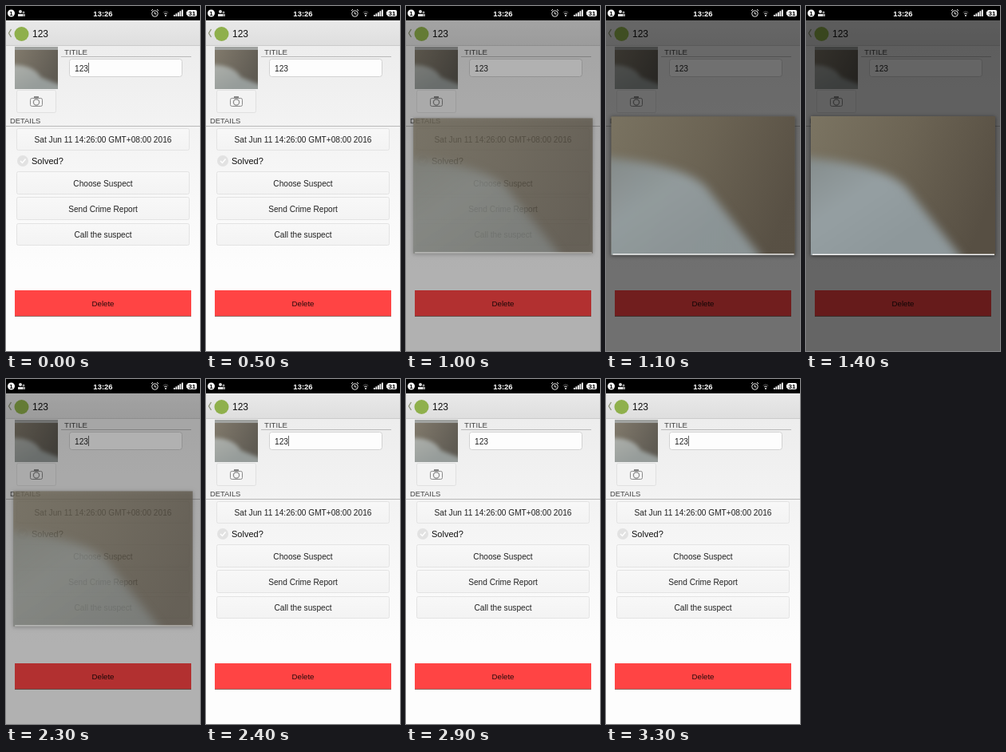
Write an HTML page with a canvas that moves like this. It is 243x432 px and loops after 3400 ms.

```html
<!DOCTYPE html>
<html lang="en">
<head>
<meta charset="utf-8">
<title>Crime details</title>
<style>
html, body { margin: 0; width: 100%; height: 100%; overflow: hidden; background: #000; }
canvas { display: block; width: 100vw; height: 100vh; }
</style>
</head>
<body>
<canvas id="stage" width="243" height="432"></canvas>
<script>
const ctx = document.getElementById('stage').getContext('2d');
const LOOP = 3400, STEP = 100;
const FONT = '"Liberation Sans", Arial, sans-serif';

function rect(x, y, w, h, fill) {
  ctx.fillStyle = fill;
  ctx.fillRect(x, y, w, h);
}

function box(x, y, w, h, r, fill, stroke) {
  ctx.beginPath();
  ctx.roundRect(x + .5, y + .5, w - 1, h - 1, r);
  ctx.fillStyle = fill;
  ctx.fill();
  ctx.strokeStyle = stroke;
  ctx.lineWidth = 1;
  ctx.stroke();
}

function disc(x, y, r, fill) {
  ctx.beginPath();
  ctx.arc(x, y, r, 0, Math.PI * 2);
  ctx.fillStyle = fill;
  ctx.fill();
}

function ring(x, y, r, stroke, width = 1, from = 0, to = Math.PI * 2) {
  ctx.beginPath();
  ctx.arc(x, y, r, from, to);
  ctx.strokeStyle = stroke;
  ctx.lineWidth = width;
  ctx.stroke();
}

function line(points, stroke, width = 1) {
  ctx.beginPath();
  points.forEach(([x, y]) => ctx.lineTo(x, y));
  ctx.strokeStyle = stroke;
  ctx.lineWidth = width;
  ctx.stroke();
}

function text(str, x, y, size, color = '#222', align = 'left', weight = '') {
  ctx.font = `${weight} ${size}px ${FONT}`;
  ctx.textAlign = align;
  ctx.fillStyle = color;
  ctx.fillText(str, x, y);
}

function gradient(x0, y0, x1, y1, ...colors) {
  const g = ctx.createLinearGradient(x0, y0, x1, y1);
  colors.forEach((c, i) => g.addColorStop(i / (colors.length - 1), c));
  return g;
}

// Soft abstract photo: warm wall above, pale curved surface below.
function photo(x, y, w, h, blur, wall, pale, edge) {
  ctx.save();
  ctx.beginPath();
  ctx.rect(x, y, w, h);
  ctx.clip();
  ctx.translate(x, y);
  rect(0, 0, w, h, gradient(0, 0, w, h * .5, ...wall));
  ctx.filter = `blur(${blur}px)`;
  const [a, b, c, d] = edge.map(([u, v]) => [u * w, v * h]);
  ctx.beginPath();
  ctx.moveTo(-w * .2, a[1] - h * .03);
  ctx.lineTo(...a);
  ctx.quadraticCurveTo(...b, ...c);
  ctx.lineTo(...d);
  ctx.lineTo(d[0], h * 1.2);
  ctx.lineTo(-w * .2, h * 1.2);
  ctx.closePath();
  ctx.fillStyle = gradient(0, h * .3, w * .35, h, ...pale);
  ctx.fill();
  ctx.restore();
}

function statusBar() {
  rect(0, 0, 243, 18, '#000');
  disc(6.5, 9, 4.5, '#fff');
  text('1', 6.5, 12, 8, '#000', 'center', 'bold');
  disc(18, 7, 2, '#ddd');
  rect(15, 10, 6, 3, '#ddd');
  disc(22, 8, 1.5, '#999');
  rect(21, 10, 3, 3, '#999');
  text('13:26', 121.5, 12.5, 9.5, '#fff', 'center', 'bold');
  ring(186.5, 9.5, 3.8, '#eee');
  line([[186.5, 7.5], [186.5, 10], [188.5, 10]], '#eee');
  line([[182, 6], [184, 4]], '#eee');
  line([[189, 4], [191, 6]], '#eee');
  ring(200, 12, 5, '#555', 1, -2.3, -.84);
  ring(200, 12, 2.8, '#ddd', 1, -2.3, -.84);
  disc(200, 12, 1, '#eee');
  for (let i = 0; i < 5; i++) rect(210 + i * 2.5, 11 - i * 1.6, 1.8, 2 + i * 1.6, '#fff');
  box(227, 5, 12, 8, 1, '#fff', '#fff');
  rect(226, 7, 1, 4, '#fff');
  text('31', 233, 12, 8, '#000', 'center', 'bold');
}

function actionBar() {
  rect(0, 18, 243, 32, gradient(0, 18, 0, 50, '#e9e9e9', '#dedede'));
  rect(0, 49, 243, 1, '#cbcbcb');
  line([[6.5, 29], [3.5, 34], [6.5, 39]], '#8d9478', 1.3);
  disc(19.5, 35, 9, '#8fb04c');
  text('123', 33, 39, 12, '#111');
}

function cameraIcon() {
  box(30, 115, 16, 11, 2, '#f4f4f4', '#8a8a8a');
  rect(35, 113, 6, 2, '#8a8a8a');
  ring(38, 120.5, 3.6, '#8a8a8a', 1.2);
}

function button(label, y, h) {
  box(13, y, 217, h, 2, gradient(0, y, 0, y + h, '#f8f8f8', '#f3f3f3'), '#e3e3e3');
  text(label, 121.5, y + h / 2 + 4, 10.15, '#222', 'center');
}

function form(cursorOn) {
  rect(0, 18, 243, 414, gradient(0, 50, 0, 330, '#ededed', '#fdfdfd'));
  actionBar();

  photo(11, 51, 54, 53, 2.5, ['#827b6d', '#716b60', '#5f5b53'], ['#b0b2ac', '#969c9a'],
    [[0, .43], [.45, .45], [.6, .72], [1.1, .92]]);
  rect(11, 51, 54, 4, '#a0a2a0');
  box(13, 105, 50, 29, 2, '#f3f3f3', '#e0e0e0');
  cameraIcon();

  text('TITILE', 73, 61, 9.7, '#444');
  rect(69, 63, 163, 1, '#b9b9b9');
  box(79, 66, 142, 23, 3, '#fdfdfd', '#d2d2d2');
  text('123', 86, 81.5, 10.2);
  if (cursorOn) rect(103, 71, 1, 13, '#666');

  text('DETAILS', 5, 147, 9.4, '#444');
  rect(0, 150, 243, 1, '#b9b9b9');
  button('Sat Jun 11 14:26:00 GMT+08:00 2016', 153, 28);
  disc(21, 194, 7, '#e2e2e2');
  line([[18, 194], [20.5, 196.5], [24.5, 191.5]], '#fff', 1.5);
  text('Solved?', 32, 198, 11, '#111');
  button('Choose Suspect', 207, 29);
  button('Send Crime Report', 239, 29);
  button('Call the suspect', 272, 28);

  rect(11, 356, 221, 32, '#ff4444');
  rect(11, 388, 221, 1, '#8f6a62');
  text('Delete', 121.5, 376, 9.7, '#260a0a', 'center');
}

function dialog(p) {
  rect(0, 18, 243, 414, `rgba(0,0,0,${.6 * p})`);
  const s = .945 + .055 * p;
  const w = 231 * s, h = 174 * s, x = 121.5 - w / 2, y = 225 - h / 2;
  ctx.save();
  ctx.globalAlpha = p;
  ctx.shadowColor = 'rgba(0,0,0,.5)';
  ctx.shadowBlur = 5;
  ctx.shadowOffsetY = 1;
  rect(x, y, w, h, '#6b6557');
  ctx.shadowColor = 'transparent';
  photo(x, y, w, h, 6, ['#7b7462', '#6c6454', '#574f43'], ['#858d8d', '#959fa2', '#8e989b'],
    [[0, .3], [.45, .36], [.54, .55], [.82, 1.02]]);
  rect(x + 2, y + h - 1.5, w - 3, 1.5, '#f4f4f4');
  ctx.restore();
}

// Dialog progress: 0 closed, 1 fully open.
function openness(t) {
  if (t < 1000 || t >= 2400) return 0;
  if (t >= 2300) return .5;
  return 1 - .5 * Math.pow(.15, (t - 1000) / STEP);
}

function draw(t) {
  const cursorOn = t < 400 || (t >= 2300 && t < 2900) || t >= 3300;
  form(cursorOn);
  const p = openness(t);
  if (p > 0) dialog(p);
  statusBar();
}

const start = performance.now();
function tick() {
  const t = (performance.now() - start) % LOOP;
  draw(Math.floor(t / STEP) * STEP);
  requestAnimationFrame(tick);
}
tick();
</script>
</body>
</html>
```
